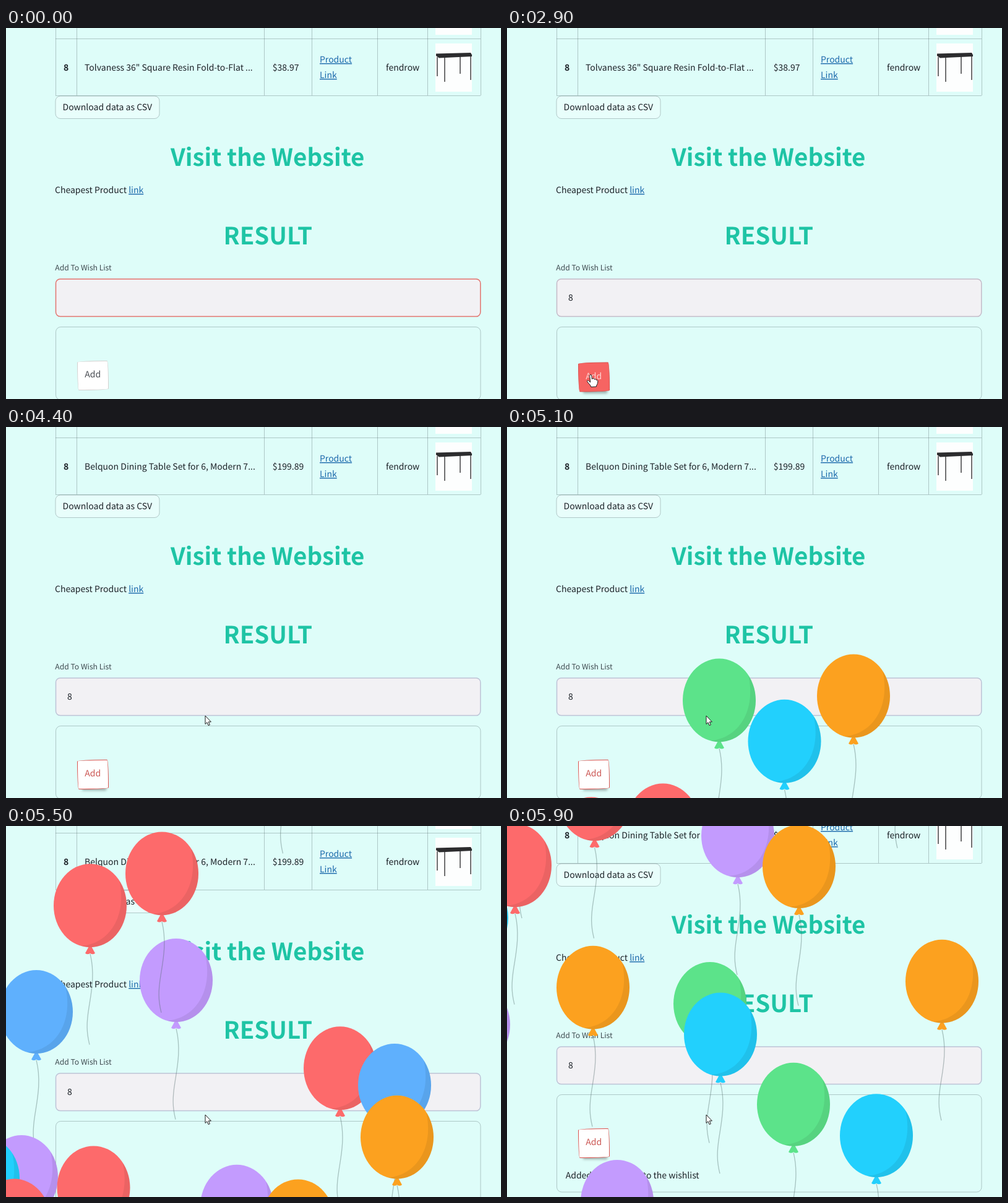
Write an HTML page with a canvas that moves like this. It is 800x600 px and loops after 6000 ms.

```html
<!DOCTYPE html>
<html lang="en">
<head>
<meta charset="utf-8">
<title>Wish list</title>
<style>
  html, body { margin: 0; width: 100%; height: 100%; overflow: hidden; background: #defdf9; }
  body { position: relative; font: 14px "Noto Sans CJK JP", "Noto Sans CJK SC", "Noto Sans CJK", "Noto Sans", sans-serif;
    text-rendering: geometricPrecision; }
  svg, canvas, #page { position: absolute; left: 0; top: 0; width: 800px; height: 600px; }
  #page svg { overflow: visible; }
  text { fill: #1d2228; }
  .bold { font-weight: 700; }
  .heading { font-weight: 700; font-size: 38.45px; fill: #1ec4a5; text-anchor: middle; }
  .label { font-size: 12.15px; fill: #3f4a50; }
  .hint { font-size: 10.45px; fill: #83868d; text-anchor: end; }
  .link { fill: #1a68ab; text-decoration: underline; }
  .line { fill: none; stroke: rgba(49, 62, 68, .28); }
  #add { position: absolute; left: 114.5px; top: 538px; width: 51.5px; height: 48px; box-sizing: border-box;
    border: 1.5px solid; border-radius: 255px 15px 225px 15px / 15px 225px 15px 255px;
    line-height: 43.5px; text-align: center; }
  .cursor { fill: #fff; stroke: #1a1a1a; stroke-linejoin: round; }
</style>
</head>
<body>
<div id="page">
  <svg viewBox="0 0 800 600">
    <path class="line" d="M80 17.5H767M80 109.5H767M80.5 0V109M114.5 0V109M417.5 0V109M494.5 0V109M600.5 0V109M681.5 0V109M767.5 0V109"/>
    <rect id="form" class="line" x="80.5" y="483.5" width="686.5" height="118" rx="8"/>
    <g id="content">
      <path fill="#fdfefe" d="M694 0h59v11h-59zM694 25h59v78h-59z"/>
      <path fill="none" stroke="#333335" stroke-width="1.4" d="M697 47V78M709 48V87M734 46V74M751 45V84"/>
      <path fill="#2c2c2e" d="M695 41.5L751 40L753 43.5V46L700 48.5L695 45Z"/>
      <text class="bold" x="93" y="68.6">8</text>
      <text id="item" x="127" y="68.6"></text>
      <text id="price" x="430.7" y="68.6"></text>
      <text class="link" x="507" y="56">Product</text>
      <text class="link" x="507" y="81">Link</text>
      <text x="614" y="68.6">fendrow</text>
      <rect class="line" x="80" y="110" width="168" height="36.5" rx="8" style="fill:rgba(255,255,255,.3)"/>
      <text x="91.5" y="133.4">Download data as CSV</text>
      <text class="heading" x="422.7" y="223.3">Visit the Website</text>
      <text x="79" y="267">Cheapest Product <tspan class="link">link</tspan></text>
      <text class="heading" x="423.3" y="350.3">RESULT</text>
      <text class="label" x="79.3" y="392">Add To Wish List</text>
      <rect id="input" x="80.5" y="406" width="686.3" height="60.6" rx="7" fill="#f2f1f4" stroke-width="1.5"/>
      <text id="typed" x="99" y="441.4">8</text>
      <text id="hint" class="hint" x="760" y="462">Press Enter to apply</text>
      <path id="caret" stroke="#333" d="M0 427V446"/>
      <text id="message" x="94.7" y="619">Added the product to the wishlist</text>
    </g>
  </svg>
  <div id="add">Add</div>
</div>
<canvas id="sky" width="800" height="600"></canvas>
<svg viewBox="0 0 800 600">
  <path id="arrow" class="cursor" d="M0 0V13.5L3 10.7L5 15.6L7.3 14.7L5.3 9.9H9.4Z"/>
  <path id="hand" class="cursor" d="M-1.4 1.2C-1.4 -.8 1.4 -.8 1.6 1L2.4 7L3 6C4.5 5 6 6 6.2 7.4C7.5 6.2 9 7 9.2 8.4C11 7.6 12 9 11.8 11C11.8 15 9.5 16 9.3 19L.8 19.5C.5 16.5 -3.5 14 -5.4 10.6C-5.8 8.6 -3.4 8.4 -2 10.6L-.4 12Z"/>
</svg>
<script>
const LOOP = 6000, STEP = 100, RISE = 725.6;
const $ = id => document.getElementById(id);
const clamp = p => Math.min(1, Math.max(0, p));
const lerp = (a, b, p) => a + (b - a) * p;
const ramp = (t, from, to) => clamp((t - from) / (to - from));
const blend = (a, b, p) => `color-mix(in srgb, ${b} ${(p * 100).toFixed(1)}%, ${a})`;
const show = (id, on) => { $(id).style.display = on ? '' : 'none'; };

// cubic-bezier(.42, 0, 1, 1)
function easeIn(p) {
  let low = 0, high = 1;
  for (let i = 0; i < 24; i++) {
    const s = (low + high) / 2, r = 1 - s;
    if (1.26 * s * r * r + 3 * r * s * s + s * s * s < p) low = s; else high = s;
  }
  return low * low * (3 - 2 * low);
}

// Linear travel through rows of [time, x, y]
function along(rows, t) {
  const i = rows.findIndex(row => row[0] > t);
  if (i < 0) return rows[rows.length - 1].slice(1);
  const a = rows[Math.max(0, i - 1)], b = rows[i], p = ramp(t, a[0], b[0]);
  return [lerp(a[1], b[1], p), lerp(a[2], b[2], p)];
}

const colors = { red: '#fd6a6b', purple: '#c39bfe', blue: '#5fb0fd', cyan: '#22d0fd', green: '#5ce38a', orange: '#fca11f' };

// [color, x, launch time], back to front
const balloons = [
  ['green', 343, 4758], ['orange', 560, 4753], ['cyan', 448.5, 4808],
  ['purple', 275, 5033], ['red', 136, 4964], ['red', 252, 4936],
  ['blue', 49, 5064], ['red', 540, 5123], ['blue', 628, 5142], ['orange', 632, 5204],
  ['purple', 25, 5258], ['cyan', -37, 5260], ['cyan', -57, 5375], ['red', 13, 5329], ['red', 141.5, 5274],
  ['purple', 373, 5304], ['orange', 472, 5330], ['orange', 139, 5440],
  ['green', 328, 5456], ['cyan', 345, 5487], ['orange', 703, 5434],
  ['green', 463, 5564], ['cyan', 597, 5602], ['purple', 178, 5696], ['purple', -54, 5477]
];

const sky = $('sky').getContext('2d');
const string = new Path2D('M0 78C8 110 2 140 -2 165S-6 205 -1 225');
const knot = new Path2D('M-2 66H2L8 77Q4 80 0 77Q-4 80 -8 77Z');
const skin = new Path2D('M-59 0A59 67.5 0 0 1 59 0A59 67.5 0 0 1 -59 0Z');
const shade = new Path2D('M47 -41A59 67.5 0 0 1 -15 65.3C32 62 60 16 47 -41Z');

function drawBalloon(color, x, y) {
  sky.setTransform(1, 0, 0, 1, x, y);
  sky.strokeStyle = 'rgba(80, 105, 105, .4)';
  sky.lineWidth = 1.3;
  sky.stroke(string);
  sky.fillStyle = color;
  sky.fill(knot);
  sky.fill(skin);
  sky.fillStyle = 'rgba(0, 0, 0, .07)';
  sky.fill(shade);
}

function drawSky(t) {
  sky.setTransform(1, 0, 0, 1, 0, 0);
  sky.clearRect(0, 0, 800, 600);
  for (const [color, x, launch] of balloons) {
    const p = (t - launch) / RISE;
    if (p > 0 && p < 1) drawBalloon(colors[color], x, 720 - 975 * easeIn(p));
  }
}

const pointer = [
  [1100, 690, 580], [1200, 560, 555], [1300, 390, 530], [1400, 205, 506], [1500, 165, 535], [1600, 139, 553],
  [2500, 139, 553], [2600, 135, 561], [3900, 135, 561], [4400, 322, 467]
];

function drawButton(t, fade) {
  const hover = ramp(t, 1500, 1800);
  const lowered = hover * (1 - ramp(t, 3900, 4100));
  const press = ramp(t, 2500, 2700) * (1 - ramp(t, 2900, 3100));
  const { style } = $('add');
  style.transform = `translateY(${lowered * 2.5}px)`;
  style.opacity = fade;
  style.background = blend('#fff', '#f66462', press);
  style.borderColor = blend('#d2d0cf', '#d9524e', Math.sqrt(hover));
  style.color = blend(blend('#484c52', '#cb5653', hover), '#ffd6d3', press);
  const [x, y, blur, spread, alpha] = [[20, 2], [38, 8], [34, 4], [-26, -6], [.2, .3]].map(([a, b]) => lerp(a, b, hover));
  style.boxShadow = `${x}px ${y}px ${blur}px ${spread}px rgba(0,0,0,${alpha})`;
}

function draw(t) {
  const updated = t >= 4400, typed = t >= 600;
  const fade = updated ? 1 : 1 - .67 * easeIn(ramp(t, 3300, 4300));
  $('content').style.opacity = fade;
  $('item').textContent = updated ? 'Belquon Dining Table Set for 6, Modern 7...' : 'Tolvaness 36" Square Resin Fold-to-Flat ...';
  $('price').textContent = updated ? '$199.89' : '$38.97';
  $('input').style.stroke = t < 2600 ? '#e2736e' : t < 3300 ? '#c4bac8' : updated ? '#bdc3d6' : '#bfb4e4';
  show('typed', typed);
  show('hint', typed && t < 2600);
  show('caret', (t >= 400 && t < 1100) || (t >= 1700 && t < 2200));
  $('caret').setAttribute('transform', `translate(${typed ? 107.5 : 99.5})`);
  drawButton(t, fade);

  const grown = t >= 5400, p = ramp(t, 5390, 5900);
  show('message', grown);
  $('form').setAttribute('height', grown ? 157.5 : 118);
  $('page').style.transform = `translateY(${-Math.round(49 * p * p * (3 - 2 * p))}px)`;
  drawSky(t);

  const pointing = t >= 1600 && t < 4000;
  show('hand', pointing);
  show('arrow', t >= 1100 && !pointing);
  $(pointing ? 'hand' : 'arrow').setAttribute('transform', `translate(${along(pointer, t)})`);
}

const start = performance.now();
function tick() {
  const elapsed = (performance.now() - start) % LOOP;
  draw(Math.floor(elapsed / STEP) * STEP);
  requestAnimationFrame(tick);
}
tick();
</script>
</body>
</html>
```
